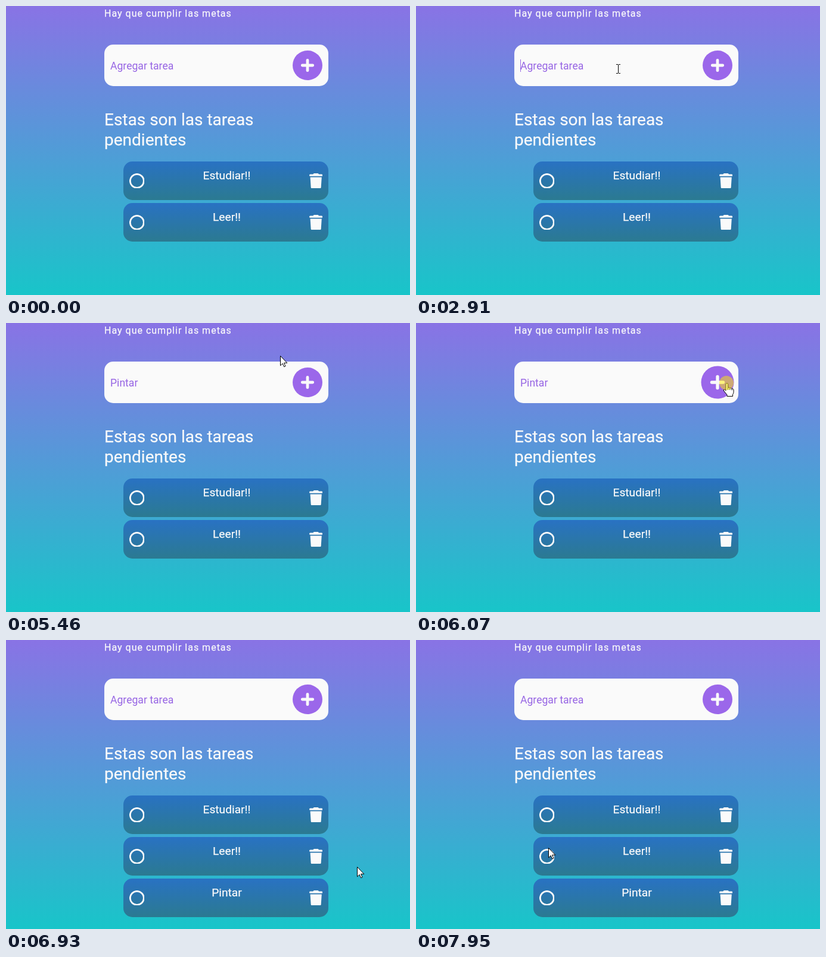
Recreate the animation shown at these times as an HTML page. Size 678 by 487 pixels, loop 8 s.

```html
<!DOCTYPE html>
<html lang="es">
<head>
<meta charset="utf-8">
<title>Lista de tareas</title>
<style>
  html, body { margin: 0; width: 100%; height: 100%; overflow: hidden; }
  #stage {
    position: relative; width: 678px; height: 487px; overflow: hidden;
    background: linear-gradient(#8973e5, #18c5c9);
    color: #fafafa; font-family: Roboto, sans-serif;
    -webkit-text-stroke: .25px;
  }
  #stage > *, .item > *, .card > * { position: absolute; white-space: nowrap; }
  .motto { left: 165px; top: 3px; font-size: 16px; line-height: 19px; letter-spacing: 1px; }
  .card { left: 165px; top: 65px; width: 376px; height: 70px; border-radius: 15px; background: #fafafa; }
  .field { left: 10px; top: 26px; height: 20px; font-size: 17.6px; line-height: 20px; color: #9765e4; -webkit-text-stroke: 0; }
  #caret { position: absolute; left: 100%; top: -1px; width: 1px; height: 21px; background: #9765e4; }
  #add { left: 316px; top: 10px; width: 50px; height: 50px; }
  .title { left: 165px; top: 174.5px; font-size: 28px; line-height: 34px; }
  .item {
    left: 197px; width: 344px; height: 65px; border-radius: 15px;
    background: linear-gradient(#2972c3, #2b7a91);
  }
  .item p { left: 73.5px; top: 12px; width: 200px; margin: 0; text-align: center; font-size: 19.2px; line-height: 23px; }
  .check { left: 9.7px; top: 19.7px; width: 25.6px; height: 25.6px; }
  .trash { left: 311.7px; top: 19.7px; width: 22.4px; height: 25.6px; }
  #overlay { left: 0; top: 0; }
</style>
</head>
<body>
<div id="stage">
  <div class="motto">Hay que cumplir las metas</div>
  <div class="card">
    <div class="field" id="hint">Agregar tarea</div>
    <div class="field"><span id="typed"></span><i id="caret"></i></div>
    <svg id="add" viewBox="-25 -25 50 50" overflow="visible">
      <circle r="25" fill="#9b67ea"/>
      <path d="M-8.7 0H8.7M0-8.7V8.7" stroke="#fafafa" stroke-width="4.8" stroke-linecap="round"/>
    </svg>
  </div>
  <div class="title">Estas son las tareas<br>pendientes</div>

  <svg id="overlay" width="678" height="487">
    <defs>
      <symbol id="ring" viewBox="0 0 512 512">
        <circle cx="256" cy="256" r="230" fill="none" stroke="#fafafa" stroke-width="55"/>
      </symbol>
      <symbol id="bin" viewBox="0 0 448 512">
        <path fill="#fafafa" d="M135 18L128 32H32a32 32 0 0 0 0 64H416a32 32 0 0 0 0-64H320l-7-14Q303 0 284 0H164Q145 0 135 18zM416 128H32L53 467Q57 512 101 512H347Q391 512 395 467z"/>
      </symbol>
    </defs>
    <g id="pointer" stroke="#000" fill="#fff" stroke-linejoin="round">
      <path id="arrow" d="M.5.5V16.8L4.2 13.3 6.7 18.8 9 17.8 6.6 12.3H11.8Z"/>
      <path id="beam" fill="none" d="M-3-7.5H0M1-7.5H4M.5-7V7M-3 7.5H0M1 7.5H4"/>
      <g id="hand" transform="translate(-.5 -.5)">
        <path d="M-1.5 2.2Q-1.5 0 .3 0T2 2.2V8Q2.2 6.8 3.8 7 5.4 7.2 5.4 8.6 5.8 7.8 7 8 8.6 8.3 8.6 9.8 9 9 10 9.2 11.5 9.6 11.5 11.5V15Q11.5 17 10 19V22H.5V19.5L-4.5 13.5Q-6 11.2-4.6 10.4-3.4 10-1.5 12.4Z"/>
        <path d="M2 8v3M5.4 8.6v2.6M8.6 9.8v2"/>
      </g>
    </g>
    <circle id="flash" r="12" fill="#ffeb00" fill-opacity=".5"/>
  </svg>
</div>
<script>
const LOOP = 8000, TICK = 66.6, BLINK = 535;
const WORD = 'Pintar', FOCUS = 1820, SUBMIT = 6130;
const keyTimes = [3240, 3590, 3860, 4120, 4260, 4460];
const $ = id => document.getElementById(id);
const show = (el, on) => { el.style.display = on ? '' : 'none'; };

// Pointer trips along cubic curves
const trips = [
  { from: 1060, to: 1620, path: [[478, 323], [360, 330], [339, 170], [339, 106]] },
  { from: 5193, to: 5930, path: [[339, 106], [470, 115], [442, -17], [522, 102]] },
  { from: 6663, to: 7480, path: [[522, 102], [522, 117], [797, 687], [247, 332]] },
  { from: 7483, to: 7950, path: [[247, 332], [240, 340], [228, 349], [222, 350]] }
];

const clicks = [
  { from: FOCUS, to: 1960, x: 337, y: 105 },
  { from: 6070, to: SUBMIT, x: 521, y: 101 }
];

const items = ['Estudiar!!', 'Leer!!', WORD].map((name, i) => {
  const el = document.createElement('div');
  el.className = 'item';
  el.style.top = 262 + 70 * i + 'px';
  el.innerHTML = `<svg class="check"><use href="#ring"/></svg><p>${name}</p><svg class="trash"><use href="#bin"/></svg>`;
  $('stage').insertBefore(el, $('overlay'));
  return el;
});

const mix = (a, b, u) => a.map((v, i) => v + (b[i] - v) * u);

function bezier(points, u) {
  while (points.length > 1) points = points.slice(1).map((p, i) => mix(points[i], p, u));
  return points[0].map(Math.round);
}

// The pointer eases out and moves in discrete ticks.
function pointerAt(t) {
  const trip = trips.filter(p => p.from <= t).pop();
  if (!trip) return null;
  const elapsed = t < trip.to ? Math.floor((t - trip.from) / TICK) * TICK : trip.to - trip.from;
  const p = elapsed / (trip.to - trip.from);
  return bezier(trip.path, 1 - (1 - p) ** 2);
}

function pointerKind([x, y]) {
  if (Math.hypot(x - 506, y - 100) < 26) return 'hand';
  return x > 165 && x < 480 && y > 65 && y < 135 ? 'beam' : 'arrow';
}

function drawField(t) {
  const done = t >= SUBMIT;
  const typed = keyTimes.filter(k => k <= t);
  const text = done ? '' : WORD.slice(0, typed.length);
  // each edit restarts the caret's blinking
  const blinkStart = typed.pop() || FOCUS;
  const lit = Math.floor((t - blinkStart) / BLINK) % 2 === 0;
  $('typed').textContent = text;
  show($('hint'), !text);
  show($('caret'), t >= FOCUS && !done && lit);
  show(items[2], done);
}

function drawPointer(t) {
  const pos = pointerAt(t);
  const kind = pos && pointerKind(pos);
  for (const id of ['arrow', 'beam', 'hand']) show($(id), id === kind);
  if (pos) $('pointer').setAttribute('transform', `translate(${pos})`);
  $('add').style.transform = kind === 'hand' ? 'scale(1.1)' : '';

  const click = clicks.find(c => t >= c.from && t < c.to);
  show($('flash'), click);
  if (click) $('flash').setAttribute('transform', `translate(${click.x} ${click.y})`);
}

const begin = performance.now();
function frame() {
  const t = (performance.now() - begin) % LOOP;
  drawField(t);
  drawPointer(t);
  requestAnimationFrame(frame);
}
frame();
</script>
</body>
</html>
```
